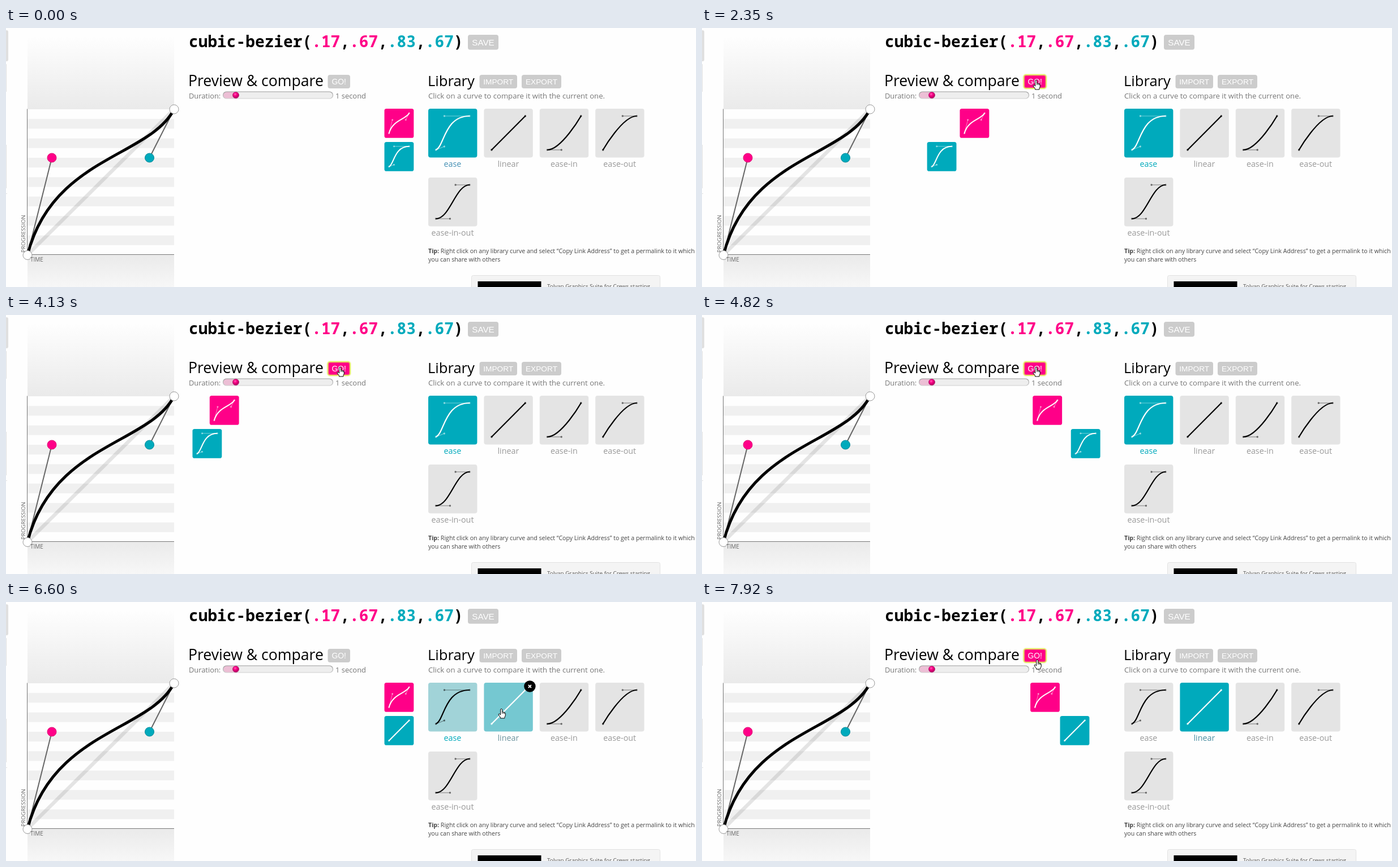
An HTML page for the animation above (8000 ms loop, 1219x459 px).

```html
<!DOCTYPE html>
<html lang="en">
<head>
<meta charset="utf-8">
<title>Easing curve comparison</title>
<style>
  html, body { margin: 0; width: 100%; height: 100%; overflow: hidden; background: #fefefe; }
  svg { display: block; width: 1219px; height: 459px; }
  text { font-family: "Open Sans", "Noto Sans", sans-serif; white-space: pre; }
  .code { font: bold 27.85px "Noto Sans Mono", "DejaVu Sans Mono", monospace; }
  .button text { font-family: "Liberation Sans", Arial, sans-serif; fill: #fff; text-anchor: middle; }
  .label { font-size: 14.3px; text-anchor: middle; }
  .soft { fill: #777; }
  .tip { font-size: 10.6px; fill: #444; }
  .pink { fill: #f08; }
  .teal { fill: #00aabc; }
</style>
</head>
<body>
<svg id="stage" viewBox="0 0 1219 459" xmlns="http://www.w3.org/2000/svg">
  <defs>
    <linearGradient id="above" x2="0" y2="1">
      <stop offset=".1" stop-color="#fefefe"/><stop offset="1" stop-color="#eaeaea"/>
    </linearGradient>
    <linearGradient id="below" x2="0" y2="1">
      <stop stop-color="#eaeaea"/><stop offset="1" stop-color="#f7f7f7"/>
    </linearGradient>
    <linearGradient id="groove" x2="0" y2="1">
      <stop stop-color="#999"/><stop offset="1" stop-color="#d0d0d0"/>
    </linearGradient>
    <radialGradient id="knob" cx=".4" cy=".35">
      <stop stop-color="#ff6ab8"/><stop offset=".5" stop-color="#f08"/><stop offset="1" stop-color="#c4006a"/>
    </radialGradient>
  </defs>

  <g fill="#e0e0e0">
    <rect x="-6" y="4" width="10" height="55" rx="3"/>
    <path d="M0 64h1v49H0zM0 207h1v77H0zM0 293h2v1H0z"/>
  </g>

  <rect x="38" width="259" height="144" fill="url(#above)"/>
  <rect x="38" y="402" width="259" height="57" fill="url(#below)"/>
  <g id="stripes" fill="#f0f0f0"></g>
  <g fill="none">
    <path d="M38 402L297 144" stroke="#000" stroke-opacity=".1" stroke-width="6.500"/>
    <path d="M37.500 143.500V401.500H297" stroke="#777"/>
    <path d="M38 402L81 230M297 144L253.500 230" stroke="#666" stroke-width="2"/>
    <path d="M38 402C82 229 253 229 297 144" stroke="#000" stroke-width="5"/>
  </g>
  <g stroke="#999">
    <circle cx="38" cy="402.500" r="8" fill="#fff"/>
    <circle cx="297" cy="144" r="8" fill="#fff"/>
    <circle cx="81" cy="230" r="8" fill="#f08" stroke="#d17"/>
    <circle cx="253.500" cy="230" r="8" fill="#00aabc" stroke="#088a9a"/>
  </g>
  <text x="43" y="414" font-size="10" fill="#666">TIME</text>
  <text transform="translate(33.500 398) rotate(-90)" font-size="9.800" fill="#666">PROGRESSION</text>

  <text class="code" x="323" y="33.500">cubic-bezier(<tspan class="pink">.17</tspan>,<tspan class="pink">.67</tspan>,<tspan class="teal">.83</tspan>,<tspan class="teal">.67</tspan>)</text>
  <text x="322" y="103" font-size="26.600">Preview &amp; compare</text>
  <text x="745" y="103" font-size="25.600">Library</text>
  <g class="soft">
    <text x="323" y="125" font-size="12.850">Duration:</text>
    <text x="582" y="125" font-size="12.950">1 second</text>
    <text x="746" y="125" font-size="13.150">Click on a curve to compare it with the current one.</text>
  </g>
  <rect x="383.500" y="113" width="194" height="12" rx="6" fill="#eee"/>
  <path d="M404 113H389.500a6 6 0 0 0 0 12H404z" fill="#ecbfd5"/>
  <rect x="383.500" y="113" width="194" height="12" rx="6" fill="none" stroke="url(#groove)" stroke-width="1.200"/>
  <circle cx="406" cy="119" r="5.500" fill="url(#knob)" stroke="#a8226b" stroke-width=".8"/>

  <g id="buttons"></g>
  <g id="tiles"></g>
  <g id="previews"></g>

  <text class="tip" x="746" y="399"><tspan font-weight="bold">Tip:</tspan> Right click on any library curve and select “Copy Link Address” to get a permalink to it which</text>
  <text class="tip" x="746" y="414">you can share with others</text>
  <rect x="822.500" y="438.500" width="333" height="40" rx="3" fill="#f4f4f4" stroke="#e2e2e2"/>
  <rect x="833.500" y="449" width="112" height="20"/>
  <text x="956" y="461" font-size="9.850" fill="#555">Tolvan Graphics Suite for Crews starting</text>

  <g id="remove">
    <circle r="10.200"/>
    <path d="M-2.500-2.500l5 5m0-5l-5 5" stroke="#fff" stroke-width="1.800"/>
  </g>
  <g id="cursor" fill="#fff" stroke="#000" stroke-linejoin="round">
    <path id="arrow" d="M0 0V16L3.700 12.500L6.200 18.200L8.700 17.100L6.200 11.600H11.500Z"/>
    <g id="hand">
      <path d="M-1.300 1.200Q.2-.7 1.700 1.200V5.600L5.800 6.700Q7.300 7.200 7.300 9V12L5.900 15.600V17H-1.500V15.500L-4.800 11Q-5.200 8.800-3.300 9.200L-1.300 11Z"/>
      <path d="M1.700 5.500V9M3.700 6.500V9M5.600 7V9.500" stroke-width=".8"/>
    </g>
  </g>
</svg>
<script>
const LOOP = 8000, TEAL = '#00aabc', GREY = '#e4e4e4', TEXT = '#999999', TILE = 86.4;
const byId = id => document.getElementById(id);
const clamp = p => Math.max(0, Math.min(1, p));
const fade = (t, from, to) => clamp((t - from) / (to - from));

function add(parent, tag, attrs, text) {
  const node = document.createElementNS('http://www.w3.org/2000/svg', tag);
  set(node, attrs);
  if (text) node.textContent = text;
  return parent.appendChild(node);
}
function set(node, attrs) {
  for (const key in attrs) node.setAttribute(key, attrs[key]);
}
function mix(from, to, p) {
  const channel = (hex, i) => parseInt(hex.slice(i, i + 2), 16);
  return `rgb(${[1, 3, 5].map(i => Math.round(channel(from, i) + (channel(to, i) - channel(from, i)) * p))})`;
}

// Solve x(s) = t by bisection, then return y(s).
function ease([x1, y1, x2, y2], t) {
  if (t <= 0 || t >= 1) return clamp(t);
  const along = (a, b, s) => 3 * (1 - s) ** 2 * s * a + 3 * (1 - s) * s * s * b + s ** 3;
  let low = 0, high = 1;
  for (let i = 0; i < 24; i++) {
    const mid = (low + high) / 2;
    if (along(x1, x2, mid) < t) low = mid; else high = mid;
  }
  return along(y1, y2, low);
}

const CURRENT = [.17, .67, .83, .67];
const CURVES = {
  'ease': [.25, .1, .25, 1],
  'linear': [0, 0, 1, 1],
  'ease-in': [.42, 0, 1, 1],
  'ease-out': [0, 0, .58, 1],
  'ease-in-out': [.42, 0, .58, 1]
};

function makeIcon(parent, curve, width) {
  const [x1, y1, x2, y2] = curve.map((v, i) => i % 2 ? 73 - 60 * v : 13.5 + 59.5 * v);
  const icon = add(parent, 'g', { fill: 'none', stroke: 'currentColor' });
  const thin = { 'stroke-opacity': .45, 'stroke-width': width / 2 };
  add(icon, 'path', { d: `M13.5 73L${x1} ${y1}M73 13L${x2} ${y2}`, ...thin });
  add(icon, 'path', { d: `M13.5 73C${x1} ${y1} ${x2} ${y2} 73 13`, 'stroke-width': width });
  for (const [cx, cy] of [[13.5, 73], [x1, y1], [x2, y2], [73, 13]])
    add(icon, 'circle', { cx, cy, r: width * .75, fill: 'currentColor', stroke: 'none', opacity: .5 });
  return icon;
}

function makeTile(name, i) {
  const x = i < 4 ? 746 + 98.4 * i : 746, y = i < 4 ? 143 : 265;
  const group = add(byId('tiles'), 'g', { transform: `translate(${x} ${y})` });
  const back = add(group, 'rect', { width: TILE, height: TILE, rx: 4, fill: GREY });
  const icon = makeIcon(group, CURVES[name], 2.2);
  const label = add(group, 'text', { class: 'label', x: 43, y: 102.5, fill: TEXT }, name);
  return { x, y, back, icon, label };
}

function makePreview(y, fill, ...curves) {
  const group = add(byId('previews'), 'g', { color: '#fff' });
  add(group, 'rect', { width: TILE, height: TILE, rx: 6, fill });
  const icons = curves.map(curve => makeIcon(group, curve, 3.4));
  return { icons, move: x => set(group, { transform: `translate(${x} ${y}) scale(.6)` }) };
}

function makeButton(text, x, y, width, height, size) {
  const group = add(byId('buttons'), 'g', { class: 'button' });
  const back = add(group, 'rect', { x, y, width, height, rx: 4, fill: '#cccccc' });
  const glow = add(group, 'g', { fill: 'none', stroke: '#e3ed5c', visibility: 'hidden' });
  add(glow, 'rect', { x, y, width, height, rx: 4, 'stroke-width': 4.5, 'stroke-opacity': .25 });
  add(glow, 'rect', { x, y, width, height, rx: 4, 'stroke-width': 2, 'stroke-opacity': .85 });
  add(group, 'text', { x: x + width / 2, y: y + height / 2 + size * .36, 'font-size': size }, text);
  return { back, glow };
}

for (let i = 1; i < 15; i += 2)
  add(byId('stripes'), 'rect', { x: 38, y: 144 + 17.2 * i, width: 259, height: 17.2 });

makeButton('SAVE', 816, 12, 54, 26.5, 15.2);
makeButton('IMPORT', 836.5, 83, 66.5, 24, 13.7);
makeButton('EXPORT', 911, 83, 70, 24, 13.7);
const go = makeButton('GO!', 568.5, 83, 39.5, 24, 13.9);
const tiles = Object.keys(CURVES).map(makeTile);
const [easeTile, linearTile] = tiles;
const pink = makePreview(143, '#ff0088', CURRENT);
const teal = makePreview(202, TEAL, CURVES.ease, CURVES.linear);

// Screen refreshes: first time, last time, count.
const REFRESHES = [
  [70, 120, 2], [270, 270, 1], [430, 660, 4], [890, 1490, 9], [1720, 1720, 1],
  [1890, 2660, 11], [2740, 2900, 3], [4130, 4900, 11], [4970, 5140, 3],
  [5370, 6150, 11], [6230, 6980, 11], [7060, 7830, 11], [7920, 7920, 1]
];
function lastRefresh(t) {
  let shown = 0;
  for (const [first, last, count] of REFRESHES) {
    if (t + 5 < first) break;
    const step = (last - first) / (count - 1) || 1;
    shown = first + step * Math.min(count - 1, Math.floor((t + 5 - first) / step));
  }
  return shown;
}

// Pointer stops: time, x, y.
const STOPS = [
  [890, 930, 372], [1490, 590, 92], [5300, 590, 92],
  [6150, 875, 189], [6990, 875, 189], [7740, 592, 102]
];
function pointer(t) {
  let at = STOPS[0];
  for (const stop of STOPS) {
    if (t < stop[0]) {
      const p = fade(t, at[0], stop[0]), s = p * p * (3 - 2 * p);
      return [at[1] + (stop[1] - at[1]) * s, at[2] + (stop[2] - at[2]) * s];
    }
    at = stop;
  }
  return [at[1], at[2]];
}

// Runs alternate direction; each lasts one second.
function previewX(curve, t) {
  const LEFT = 323, RIGHT = 668.5;
  const out = ease(curve, (t - 1870) / 1000);
  const back = ease(curve, (t - 4097) / 1000);
  const again = ease(curve, (t - 7816) / 1000);
  return RIGHT + (LEFT - RIGHT) * (out - back + again);
}

const show = (node, on) => set(node, { visibility: on ? 'visible' : 'hidden' });

function draw(time) {
  const t = lastRefresh(time);
  const [x, y] = pointer(t);
  const visible = t >= 890;
  const inside = (left, top, w, h) => visible && x >= left && x <= left + w && y >= top && y <= top + h;
  const overGo = inside(568, 83, 40, 24);
  const overTile = tiles.find(tile => inside(tile.x, tile.y, TILE, TILE));
  const focused = t >= 1720 && t < 6140 || t >= 7800;
  const swapped = t > 6480;

  set(go.back, { fill: overGo || focused ? '#ff0088' : '#cccccc' });
  show(go.glow, focused);

  pink.move(previewX(CURRENT, t));
  teal.move(previewX(swapped ? CURVES.linear : CURVES.ease, t));
  show(teal.icons[0], !swapped);
  show(teal.icons[1], swapped);

  set(easeTile.back, { fill: mix(TEAL, GREY, fade(t, 6393, 6693)) });
  set(linearTile.back, { fill: mix(GREY, TEAL, fade(t, 6459, 6759)) });
  tiles.forEach(tile => set(tile.icon, { color: tile === (swapped ? linearTile : easeTile) ? '#fff' : '#000' }));
  set(easeTile.label, {
    fill: t < 6600 ? mix('#4590b4', TEAL, fade(t, 0, 660)) : mix(TEAL, TEXT, fade(t, 6610, 6900))
  });
  set(linearTile.label, { fill: mix(TEXT, '#4a8fa2', fade(t, 6400, 6760)) });

  show(byId('remove'), overTile);
  if (overTile) set(byId('remove'), { transform: `translate(${overTile.x + 81} ${overTile.y + 6.5})` });

  const hand = overGo || overTile;
  show(byId('arrow'), visible && !hand);
  show(byId('hand'), visible && hand);
  set(byId('cursor'), { transform: `translate(${x} ${y})` });
}

const start = performance.now();
function tick() {
  draw((performance.now() - start) % LOOP);
  requestAnimationFrame(tick);
}
tick();
</script>
</body>
</html>
```
